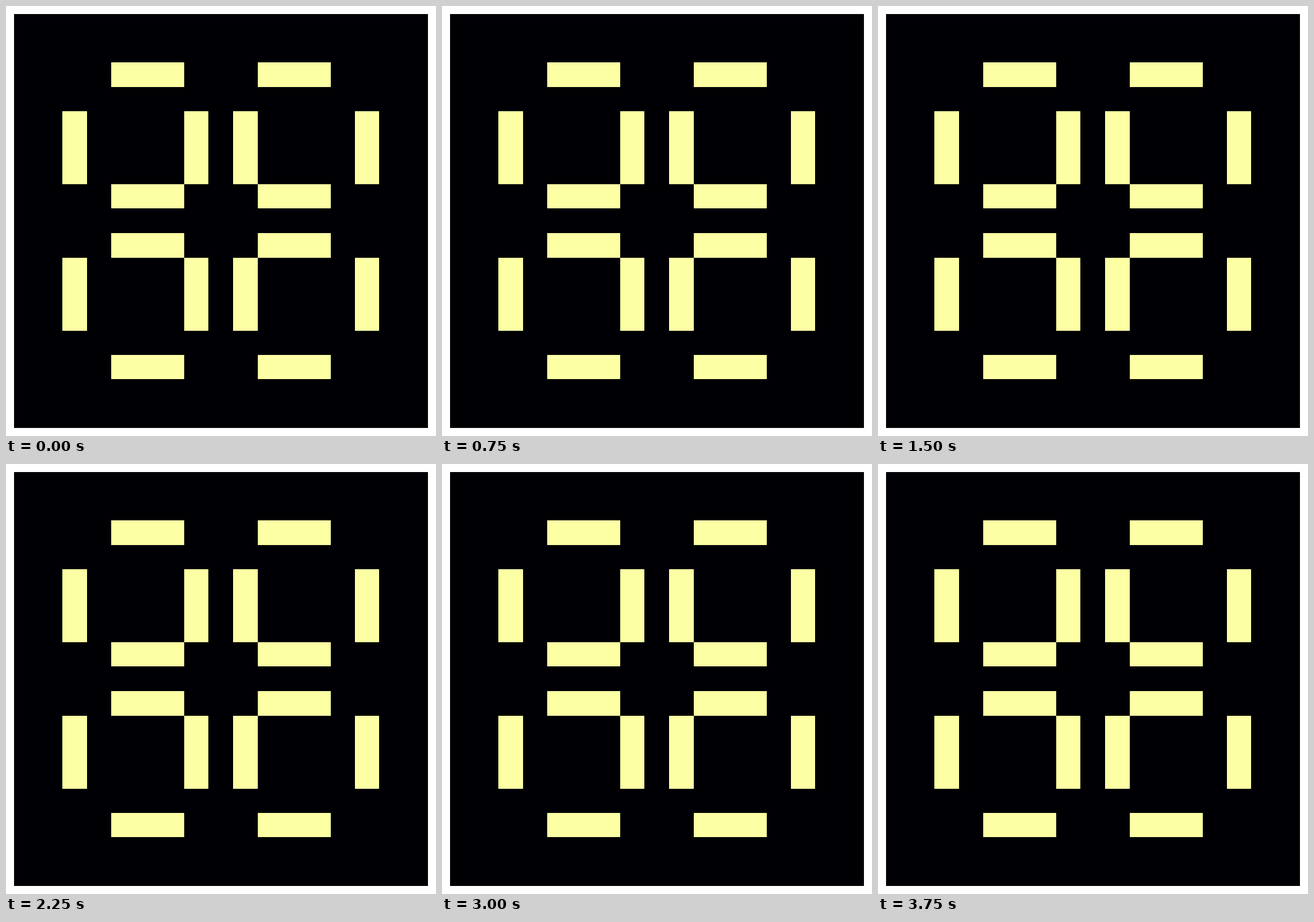
Animation, 748 px wide and 748 px high, one loop 4000 ms. Source, as an HTML page with a canvas:

```html
<!DOCTYPE html>
<html lang="en">
<head>
<meta charset="utf-8">
<title>Pulsar</title>
<style>
  html, body { margin: 0; width: 100%; height: 100%; overflow: hidden; background: #fff; }
  canvas { display: block; }
</style>
</head>
<body>
<canvas id="stage" width="748" height="748"></canvas>
<script>
const ctx = document.getElementById('stage').getContext('2d');
const SIZE = 17, MARGIN = 14, BOARD = 720;
const STEP_MS = 250, LOOP_STEPS = 16;
const range = [...Array(SIZE).keys()];

// Cell borders snapped to whole pixels: down in the first half, nearest in the second.
const edge = k => Math.floor(MARGIN + k * BOARD / SIZE + (k > SIZE / 2 + 1 ? 0.5 : 0));

const isLine = k => [2, 7, 9, 14].includes(k);
const isSpan = k => (k >= 4 && k <= 6) || (k >= 10 && k <= 12);
const pulsar = range.map(y => range.map(x =>
  (isLine(y) && isSpan(x)) || (isLine(x) && isSpan(y))));

// One generation of Conway's Game of Life.
function evolve(grid) {
  return grid.map((row, y) => row.map((alive, x) => {
    let neighbours = 0;
    for (let dy = -1; dy <= 1; dy++)
      for (let dx = -1; dx <= 1; dx++)
        if ((dx || dy) && grid[y + dy]?.[x + dx]) neighbours++;
    return neighbours === 3 || (alive && neighbours === 2);
  }));
}

const generations = [pulsar];
while (generations.length < LOOP_STEPS) generations.push(evolve(generations.at(-1)));

function draw(grid) {
  ctx.fillStyle = '#fff';
  ctx.fillRect(0, 0, 748, 748);
  ctx.fillStyle = '#000004';
  ctx.fillRect(MARGIN, MARGIN, BOARD, BOARD);
  ctx.fillStyle = '#fcffa4';
  grid.forEach((row, y) => row.forEach((alive, x) => {
    if (alive) ctx.fillRect(edge(x), edge(y), edge(x + 1) - edge(x), edge(y + 1) - edge(y));
  }));
}

function tick() {
  draw(generations[Math.floor(performance.now() / STEP_MS) % LOOP_STEPS]);
  requestAnimationFrame(tick);
}
tick();
</script>
</body>
</html>
```
